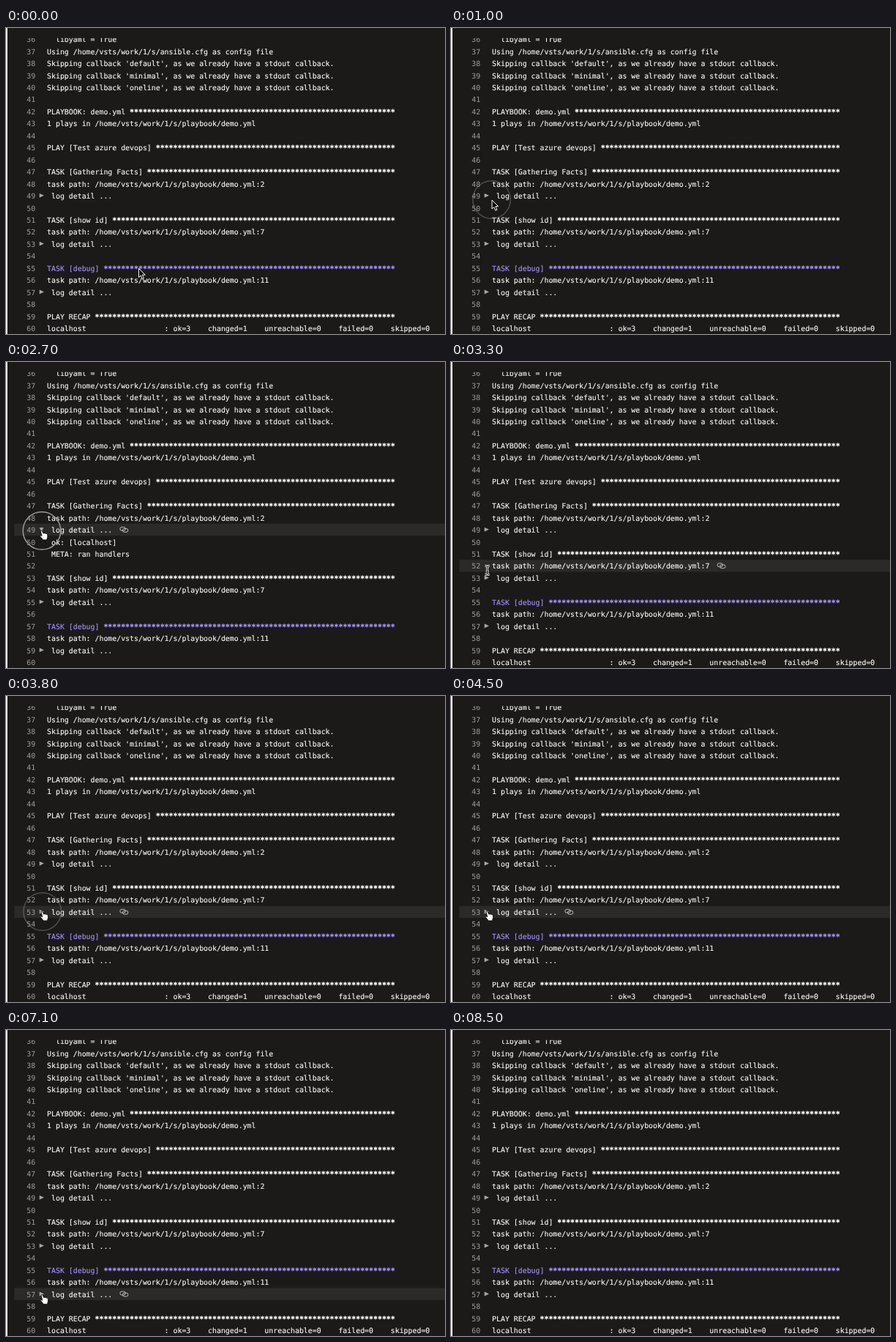
Animation of 600 by 418 pixels, one loop 8600 ms. Source, as an HTML page:

```html
<!DOCTYPE html>
<html lang="en">
<head>
<meta charset="utf-8">
<title>Build log</title>
<style>
  html, body { margin: 0; width: 100%; height: 100%; overflow: hidden; background: #1b1a19; }
  svg { display: block; width: 600px; height: 418px; }
  text {
    font: 9.88px "DejaVu Sans Mono", monospace; white-space: pre; text-rendering: geometricPrecision;
    fill: #f6f5f4; stroke: #f6f5f4; stroke-width: .15;
  }
  .num { fill: #a09e9c; stroke: none; }
  .debug { fill: #a38df8; stroke: #a38df8; }
  .stars { stroke-width: .5; }
  .fold { fill: #a9a7a5; }
  .link { fill: none; stroke: #d0cecc; stroke-width: .9; }
  .ring { fill: none; stroke: #9b9a99; stroke-width: 1.5; }
  .beam { fill: none; stroke: #fff; stroke-width: 2.8; }
  .beam + .beam { stroke: #000; stroke-width: 1; }
</style>
</head>
<body>
<svg viewBox="0 0 600 418">
  <defs><clipPath id="view"><rect y="13.8" width="600" height="405"/></clipPath></defs>
  <rect width="600" height="418" fill="#1b1a19"/>
  <rect width="2" height="418" fill="#e8e7e6"/>
  <rect id="hover" x="11.5" width="589" height="16.4" fill="#2b2a29"/>
  <g id="log" clip-path="url(#view)"></g>
  <g id="link" class="link">
    <rect x="-5.5" y="-3.4" width="7.4" height="4.8" rx="2.4"/>
    <rect x="-1.9" y="-1.4" width="7.4" height="4.8" rx="2.4"/>
  </g>
  <circle id="ring" class="ring" r="25.8"/>
  <g id="cursor">
    <path id="arrow" fill="#000" stroke="#fff" stroke-width="1" stroke-linejoin="round"
      d="M.5 .5V12.6L3.3 10 5.3 14.8 7.4 13.9 5.4 9.2H9.2Z"/>
    <path id="hand" fill="#fff" stroke="#000" stroke-width=".8" stroke-linejoin="round"
      d="M-1.6 .8C-1.9-.5-.1-.8 .4 .3L2 3.8C2.6 2.9 3.6 3 4 3.8 4.6 3.1 5.6 3.4 5.9 4.2 6.8 3.8 7.5 4.4 7.6 5.4 7.9 7.2 8 8.7 7.2 10.2L7 12.4H1.4C.6 10.7-.8 9.8-2.2 7.8-3.2 6.4-1.8 5.8-.4 7.1L.1 7.2Z"/>
    <g id="beam">
      <path class="beam" d="M-3-6Q0-6 0-4 0-6 3-6M0-4V4M-3 6Q0 6 0 4 0 6 3 6M-2 2.5H2"/>
      <path class="beam" d="M-3-6Q0-6 0-4 0-6 3-6M0-4V4M-3 6Q0 6 0 4 0 6 3 6M-2 2.5H2"/>
    </g>
  </g>
</svg>
<script>
const LOOP = 8600, STEP = 100;
const FIRST = 36, ROWS = 25, PITCH = 16.455, TOP = 6.95;
const TEXT_X = 56.1, CHAR = 5.948;

const banner = title => title + ' ' + '*'.repeat(79 - title.length);
const path = n => 'task path: /home/vsts/work/1/s/playbook/demo.yml:' + n;
const skip = name => `Skipping callback '${name}', as we already have a stdout callback.`;
const fold = (...body) => ({ label: ' log detail ...', body });

const facts = fold('ok: [localhost]', 'META: ran handlers');
const showId = fold('changed: [localhost] => {', '    "changed": true,', '    "cmd": [',
  '        "id"', '    ],', '    "rc": 0', '}');
const debug = fold('ok: [localhost] => {', '    "changed": false', '}');

const lines = [
  '  libyaml = True',
  'Using /home/vsts/work/1/s/ansible.cfg as config file',
  skip('default'), skip('minimal'), skip('oneline'), '',
  banner('PLAYBOOK: demo.yml'), '1 plays in /home/vsts/work/1/s/playbook/demo.yml', '',
  banner('PLAY [Test azure devops]'), '',
  banner('TASK [Gathering Facts]'), path(2), facts, '',
  banner('TASK [show id]'), path(7), showId, '',
  banner('TASK [debug]'), path(11), debug, '',
  banner('PLAY RECAP'),
  'localhost'.padEnd(27) + ': ok=3    changed=1    unreachable=0    failed=0    skipped=0'
];

// spans during which each fold is open
facts.open = [2200, 3000];
showId.open = [3900, 4500];
debug.open = [6100, 7100];

// cursor stops: time, x, y
const stops = [
  [0, 181, 328], [700, 55.5, 234.5], [1600, 55.5, 234.5], [1700, 49, 230.5], [3000, 49, 230.5],
  [3400, 49.7, 294.5], [4600, 49.7, 294.5], [5600, 49.7, 362], [7200, 49.7, 362], [7700, 240, 110]
];
const clicks = [700, 1700, 2600, 3500, 4100, 5700, 6700];
const RING = 400, FOCUS = 1700, LEAVE = 7300, GONE = 7800;

const $ = id => document.getElementById(id);
const show = (el, on) => el.setAttribute('display', on ? 'inline' : 'none');
const move = (el, x, y) => el.setAttribute('transform', `translate(${x.toFixed(2)} ${y.toFixed(2)})`);
const rowTop = i => TOP + i * PITCH;

function add(parent, tag, attrs = {}, text = '') {
  const el = document.createElementNS('http://www.w3.org/2000/svg', tag);
  for (const key in attrs) el.setAttribute(key, attrs[key]);
  el.textContent = text;
  return parent.appendChild(el);
}

const rows = Array.from({ length: ROWS }, (_, i) => {
  const log = $('log'), y = rowTop(i) + 12.25;
  add(log, 'text', { class: 'num', x: 28.3, y }, FIRST + i);
  const text = add(log, 'text', { x: TEXT_X, y });
  return {
    i, text,
    words: add(text, 'tspan'),
    stars: add(text, 'tspan', { class: 'stars' }),
    mark: add(log, 'path', { class: 'fold' })
  };
});

function visibleLines(t) {
  return lines.flatMap(line => {
    if (!line.label) return [{ text: line }];
    const open = t >= line.open[0] && t < line.open[1];
    const head = { text: line.label, fold: true, open };
    return open ? [head, ...line.body.map(s => ({ text: ' ' + s }))] : [head];
  }).slice(0, ROWS);
}

function cursorAt(t) {
  const next = stops.findIndex(s => s[0] > t);
  if (next < 0) return stops[stops.length - 1].slice(1);
  const [t0, x0, y0] = stops[next - 1], [t1, x1, y1] = stops[next];
  const u = (t - t0) / (t1 - t0), k = u * u * (3 - 2 * u);
  return [x0 + (x1 - x0) * k, y0 + (y1 - y0) * k];
}

function drawLog(view) {
  rows.forEach(({ i, text, words, stars, mark }) => {
    const line = view[i], y = rowTop(i) + 8;
    words.textContent = line.text.replace(/\*+$/, '');
    stars.textContent = line.text.slice(words.textContent.length);
    text.setAttribute('class', line.text.startsWith('TASK [debug]') ? 'debug' : '');
    show(mark, line.fold);
    mark.setAttribute('d', line.open ? `M45.5 ${y - 2.5}h6l-3 5.4z` : `M45.7 ${y - 2.9}v5.8l6.3-2.9z`);
  });
}

function draw(t) {
  const view = visibleLines(t);
  drawLog(view);

  const [x, y] = cursorAt(t);
  const row = Math.floor((y - TOP) / PITCH);
  const focused = t >= FOCUS, hovering = focused && t < LEAVE;
  show($('hover'), hovering);
  show($('link'), hovering);
  $('hover').setAttribute('y', rowTop(row));
  move($('link'), TEXT_X + view[row].text.length * CHAR + 16, rowTop(row) + 8.1);

  const onFold = view[row].fold && x < 60;
  show($('cursor'), t < GONE);
  show($('arrow'), !focused);
  show($('hand'), focused && onFold);
  show($('beam'), focused && !onFold);
  move($('cursor'), x, y);

  const click = clicks.find(c => t >= c && t < c + RING);
  show($('ring'), click !== undefined);
  if (click !== undefined) {
    move($('ring'), x, y);
    $('ring').setAttribute('opacity', Math.min(1, 1.6 - 1.6 * (t - click) / RING));
  }
}

const start = performance.now();
let last = -1;
function tick(now) {
  const t = Math.floor(Math.max(0, now - start) % LOOP / STEP) * STEP;
  if (t !== last) draw(last = t);
  requestAnimationFrame(tick);
}
draw(0);
requestAnimationFrame(tick);
</script>
</body>
</html>
```
